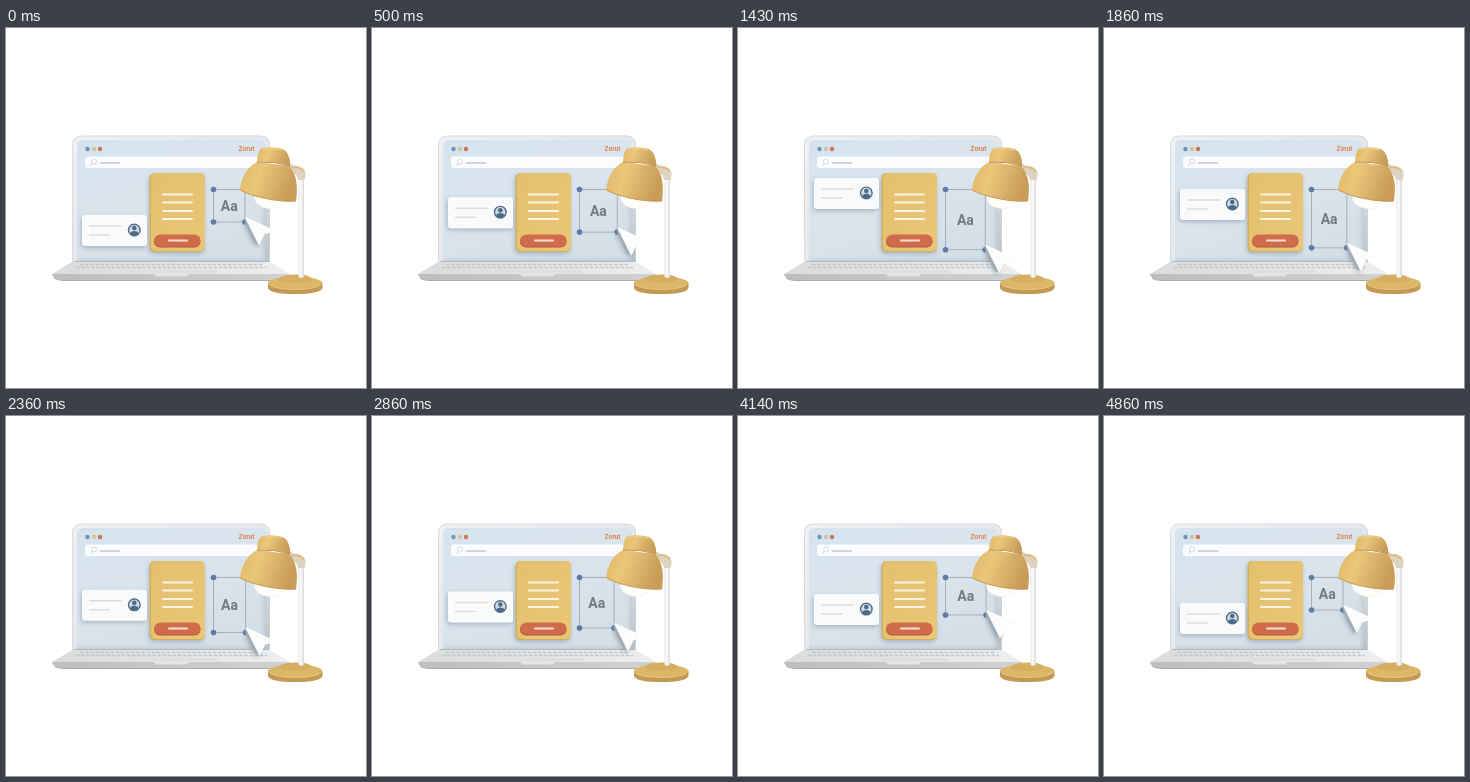
Write an HTML page that moves like this. It is 360 by 360 pixels and loops after 4.93 s.

```html
<!DOCTYPE html>
<html lang="en">
<head>
<meta charset="utf-8">
<title>Laptop and lamp</title>
<style>
  @property --card { syntax: "<number>"; inherits: true; initial-value: 187; }
  @property --x { syntax: "<number>"; inherits: true; initial-value: 239; }
  @property --y { syntax: "<number>"; inherits: true; initial-value: 194; }

  html, body { margin: 0; width: 100%; height: 100%; overflow: hidden; background: #fff; }
  svg {
    display: block; width: 100vw; height: 100vh;
    animation: card 4930ms ease-in-out infinite,
               cornerX 4930ms ease-in-out infinite,
               cornerY 4930ms ease-in-out infinite;
  }

  @keyframes card {
    0%, 95.5%, 100% { --card: 187; }
    21.7% { --card: 147; }
    54.8% { --card: 176.5; }
    70% { --card: 165.5; }
  }
  @keyframes cornerX {
    0%, 98.5%, 100% { --x: 239; }
    18.3% { --x: 249.5; }
    50.7% { --x: 239.5; }
    74.5% { --x: 252.5; }
  }
  @keyframes cornerY {
    0%, 98.5%, 100% { --y: 194; }
    24.3% { --y: 222; animation-timing-function: ease-in; }
    58% { --y: 212; animation-timing-function: ease-out; }
    77.1% { --y: 200.3; }
  }

  .card { transform: translate(76px, calc(var(--card) * 1px)); }
  .box { width: calc((var(--x) - 207.5) * 1px); height: calc((var(--y) - 161.5) * 1px); }
  .tr { transform: translate(calc(var(--x) * 1px), 161.5px); }
  .bl { transform: translate(207.5px, calc(var(--y) * 1px)); }
  .br { transform: translate(calc(var(--x) * 1px), calc(var(--y) * 1px)); }
  .aa {
    transform: translate(calc((var(--x) + 207.5) * .5px), calc((var(--y) + 161.5) * .5px));
    font: 700 14px Roboto, sans-serif; fill: #737982;
  }
  .cursor { transform: translate(calc((var(--x) + 1) * 1px), calc((var(--y) - 4) * 1px)); }
  .brand { font: 700 6px Inter, sans-serif; fill: #dc7d42; }
  .line { fill: none; stroke-linecap: round; }
</style>
</head>
<body>
<svg viewBox="0 0 360 360">
  <defs>
    <linearGradient id="screen" x1="0" y1="0" x2=".6" y2="1">
      <stop offset="0" stop-color="#d6e3ee"/>
      <stop offset=".55" stop-color="#dae4ed"/>
      <stop offset="1" stop-color="#d5dfe7"/>
    </linearGradient>
    <linearGradient id="bezel" x1="0" y1="0" x2="1" y2="1">
      <stop offset="0" stop-color="#eff1f3"/>
      <stop offset=".6" stop-color="#e2e6ea"/>
      <stop offset="1" stop-color="#b9c0c7"/>
    </linearGradient>
    <linearGradient id="deck">
      <stop offset="0" stop-color="#dadbdb"/>
      <stop offset="1" stop-color="#edeeef"/>
    </linearGradient>
    <linearGradient id="front">
      <stop offset="0" stop-color="#bdbebe"/>
      <stop offset="1" stop-color="#d0d1d2"/>
    </linearGradient>
    <linearGradient id="panel" x1="0" y1="0" x2="1" y2="1">
      <stop offset="0" stop-color="#e4c06c"/>
      <stop offset="1" stop-color="#e8c778"/>
    </linearGradient>
    <linearGradient id="shade" x1="0" y1="0" x2="1" y2=".25">
      <stop offset="0" stop-color="#dfb561"/>
      <stop offset=".38" stop-color="#ebc77b"/>
      <stop offset="1" stop-color="#c99c58"/>
    </linearGradient>
    <linearGradient id="post">
      <stop offset="0" stop-color="#e8e8e8"/>
      <stop offset=".4" stop-color="#fcfcfc"/>
      <stop offset="1" stop-color="#d8d8d9"/>
    </linearGradient>
    <filter id="soft" x="-30%" y="-30%" width="160%" height="160%">
      <feDropShadow dx="-1" dy="2" stdDeviation="2" flood-color="#5d7186" flood-opacity=".4"/>
    </filter>
    <filter id="blur" x="-10%" y="-10%" width="120%" height="120%">
      <feGaussianBlur stdDeviation="2.5"/>
    </filter>
    <clipPath id="glass">
      <path d="M71 233V118Q71 112 77 112H253Q259.500 112 259.500 118V233Z"/>
    </clipPath>
  </defs>

  <!-- Laptop -->
  <path d="M66 236V117Q66 107.500 76 107.500H254Q264 107.500 264 117V236Z" fill="url(#bezel)"/>
  <path d="M66.500 234V117Q66.500 108 76 108H254Q263.500 108 263.500 117V234" fill="none" stroke="#d0d4d8" stroke-width=".7"/>
  <g clip-path="url(#glass)">
    <rect x="70" y="111" width="191" height="123" fill="url(#screen)"/>
    <path d="M71 235H261V170" fill="none" stroke="#96a2ae" stroke-width="4" opacity=".65" filter="url(#blur)"/>
  </g>
  <path d="M68 233.500H263" stroke="#b4b9be"/>
  <path d="M66 234H264L284 246H46Z" fill="url(#deck)"/>
  <path d="M74 236.500H256M70 239.500H261" fill="none" stroke="#c3c5c7" stroke-width="1.300" stroke-dasharray="3.500 1.600"/>
  <path d="M122 242H210L213 245H119Z" fill="#dddfe0"/>
  <path d="M46 246H284Q284 251 274 252.500H57Q46 251 46 246Z" fill="url(#front)"/>
  <path d="M48 250Q51 252.500 60 252.500H270Q279 252.500 282 250" fill="none" stroke="#a9abad"/>
  <path d="M148 246H183Q182 248.500 179 248.500H152Q149 248.500 148 246Z" fill="#e4e5e6"/>

  <circle cx="81.500" cy="121" r="2.200" fill="#6f93b6"/>
  <circle cx="88" cy="121" r="2.200" fill="#d3c4a2"/>
  <circle cx="94" cy="121" r="2.200" fill="#cc7355"/>
  <text class="brand" x="232.500" y="123.300">Zorut</text>
  <rect x="79" y="128.500" width="173" height="11.500" rx="3" fill="#fbfcfd"/>
  <circle cx="88" cy="133.500" r="2.600" fill="none" stroke="#cbd1d7" stroke-width=".8"/>
  <path d="M86 135.500L84.500 137.500" class="line" stroke="#cbd1d7"/>
  <path d="M94.500 135H113.500" class="line" stroke="#d0d4d9" stroke-width="1.800"/>

  <!-- Form panel -->
  <g filter="url(#soft)">
    <rect x="143.500" y="145" width="55.500" height="79" rx="5" fill="#d3ae5c"/>
    <rect x="145" y="145" width="54" height="78" rx="5" fill="url(#panel)"/>
  </g>
  <path d="M157 166.500H186M157 174.500H186M157 183H186M157 191H186" class="line" stroke="#fbf3e2" stroke-width="2"/>
  <rect x="148" y="207.500" width="46.500" height="12" rx="6" fill="#b35a3d"/>
  <rect x="148.500" y="206.500" width="46" height="12" rx="6" fill="#d06c4b"/>
  <path d="M163 212.500H181" class="line" stroke="#f8e2d6" stroke-width="1.900"/>

  <!-- Profile card -->
  <g class="card">
    <rect width="65" height="31" rx="3" fill="#f9fafb" filter="url(#soft)"/>
    <path d="M7.500 11H39.500M7.500 20H27.500" class="line" stroke="#dadcdf" stroke-width="1.500"/>
    <circle cx="52.300" cy="15" r="5.800" fill="#d3dde5" stroke="#4d6b88" stroke-width="1.400"/>
    <circle cx="52.300" cy="13" r="2.300" fill="#4d6b88"/>
    <path d="M48 18.800Q48.500 15.900 52.300 15.900T56.600 18.800Q52.300 22.400 48 18.800Z" fill="#4d6b88"/>
  </g>

  <!-- Text frame -->
  <rect class="box" x="207.500" y="161.500" fill="none" stroke="#a1abb8" stroke-width=".9"/>
  <g fill="#5f7ba3">
    <circle cx="207.500" cy="161.500" r="2.800"/>
    <circle class="tr" r="2.800"/>
    <circle class="bl" r="2.800"/>
    <circle class="br" r="2.800"/>
  </g>
  <text class="aa" y="5" text-anchor="middle">Aa</text>

  <g class="cursor">
    <path d="M-1 1L0 7L9 25L13 26L16 15Z" fill="#a3abb4" stroke="#a3abb4" stroke-linejoin="round" filter="url(#soft)"/>
    <path d="M0 0L28 13L18 15.500L13 26Z" fill="#fcfcfd" stroke="#fcfcfd" stroke-width="1.500" stroke-linejoin="round"/>
  </g>

  <!-- Lamp -->
  <path d="M262 255V260Q264 266 289 266T316.500 260V255Z" fill="#c39a53"/>
  <ellipse cx="289.200" cy="255" rx="27.200" ry="6.500" fill="#ddb768"/>
  <path d="M264 257Q270 261.300 289 261.500T314 257" fill="none" stroke="#ebcb8c" stroke-width=".8"/>
  <path d="M272 252Q273 247 289 246.500T306 252Q300 255 289 255T272 252Z" fill="#d5ae61"/>
  <path d="M292.500 148H298V249Q295.200 250.500 292.500 249Z" fill="url(#post)"/>
  <path d="M281 137L293 143" class="line" stroke="#d9d8d5" stroke-width="5"/>
  <path d="M284 139Q291 135.500 298 141Q301 146 298.500 152H292Q292 146 284 145Z" fill="#ddd3c0"/>
  <path d="M286 139.500Q293 138 297 143" class="line" stroke="#dfbd7c" stroke-width="1.800"/>
  <ellipse cx="263" cy="171.500" rx="14.500" ry="9" fill="#fffefb" stroke="#efeae0" stroke-width=".5" transform="rotate(8 263 171.500)"/>
  <path d="M251 134C240 140 235 151 234 162C245 168 272 174.500 290 173C292 159 291 146 283 138Z" fill="url(#shade)"/>
  <path d="M234.500 162C246 168.500 272 174.500 290 173" fill="none" stroke="#c29754"/>
  <path d="M251 134Q251.500 124 255 120.500Q266 118 277 121Q284 125 284.500 138Q268 133 251 134Z" fill="url(#shade)"/>
  <path d="M251 134Q268 133 284.500 138" fill="none" stroke="#bd9250"/>
  <path d="M256 121.300Q266 119 276 122" fill="none" stroke="#eed08f"/>
</svg>
</body>
</html>
```
